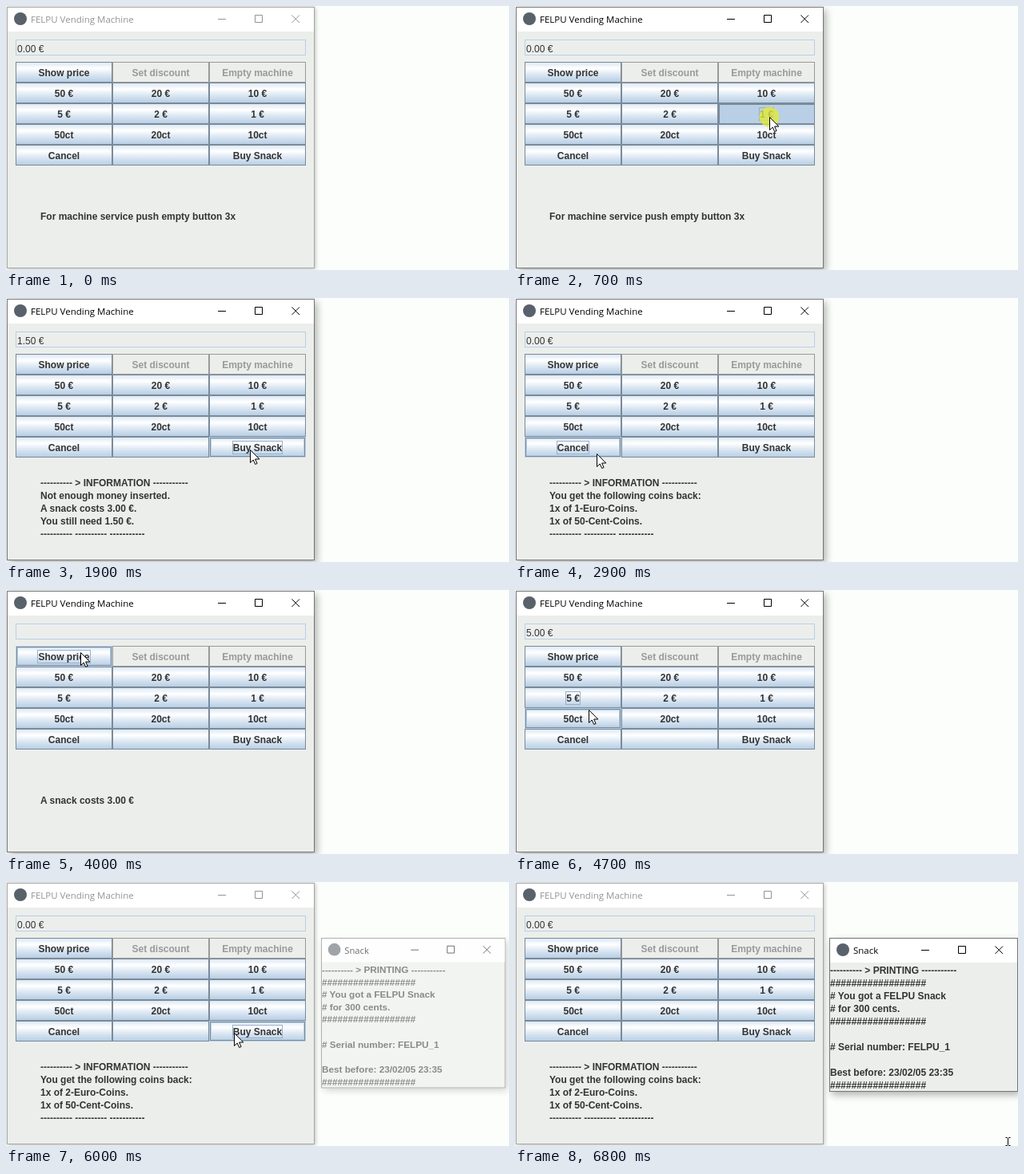
Recreate the animation shown at these times as an HTML page. Size 629x331 px, loop 6.9 s.

```html
<!DOCTYPE html>
<html lang="en">
<head>
<meta charset="utf-8">
<title>Vending machine</title>
<style>
  html, body { margin: 0; width: 100%; height: 100%; overflow: hidden; background: #fcfefc; }
  body { position: relative; font: bold 12px/16px "Liberation Sans", Arial, sans-serif; color: #333; }
  body * { position: absolute; box-sizing: border-box; white-space: pre; }

  .window {
    background: #eceeec; color: #333; transform-origin: 0 0; --ink: #000;
    box-shadow: inset 0 0 0 1px #747674, 3px 4px 9px rgba(0, 0, 0, .3);
  }
  .window.inactive { --ink: #929492; box-shadow: inset 0 0 0 1px #a4a6a4, 1px 1px 5px rgba(0, 0, 0, .25); }
  .bar { left: 1px; right: 1px; top: 1px; height: 30px; background: #fff; }
  .icon { left: 9px; top: 7px; width: 16px; height: 16px; border-radius: 50%; background: #59616b; }
  .title { left: 30px; top: 8px; font: 11.5px/16px "Open Sans", "Noto Sans", sans-serif; color: var(--ink); }
  .controls { right: 0; top: 0; fill: none; stroke: var(--ink); }

  #field { left: 11px; top: 41px; width: 363px; height: 20px; padding: 3px 0 0 1px; border: 1px solid #b8cfe5; font-weight: normal; }
  #message { left: 42px; top: 223px; height: 80px; display: flex; align-items: center; }
  #receipt { left: 1px; top: 33px; }

  .button {
    width: 121px; height: 26px; display: flex; justify-content: center; border: 1px solid #7a8a99;
    background: linear-gradient(#dde8f3, #fff 30%, #dde8f3 60%, #b8cfe5);
  }
  .button span { position: static; height: 15px; margin-top: 5px; }
  .button.disabled { background: none; border-color: #999; color: #999; }
  .button.hover { border-color: #b8cfe5; box-shadow: inset 0 0 0 1px #7a8a99, inset 0 0 0 2px #b8cfe5; }
  .button.pressed { background: #b8cfe5; border-color: #7a8a99; box-shadow: inset 1px 1px #7a8a99; }
  .button.focus span:not(:empty) { outline: 1px solid #96b0cc; }

  #pointer { left: 0; top: 0; overflow: visible; }
</style>
</head>
<body>
<script>
const LOOP = 6900, STEP = 100;
const RULE = "---------- ---------- -----------";
const info = (...lines) => ["---------- > INFORMATION -----------", ...lines, RULE].join("\n");
const change = coin => info("You get the following coins back:", `1x of ${coin}-Euro-Coins.`, "1x of 50-Cent-Coins.");

const LABELS = [
  "Show price", "Set discount", "Empty machine",
  "50 €", "20 €", "10 €",
  "5 €", "2 €", "1 €",
  "50ct", "20ct", "10ct",
  "Cancel", "", "Buy Snack"
];
const DISABLED = ["Set discount", "Empty machine"];

const FIELD = [
  [0, "0.00 €"], [800, "1.00 €"], [1500, "1.50 €"], [2800, "0.00 €"],
  [3800, ""], [4700, "5.00 €"], [5000, "5.50 €"], [5600, "0.00 €"]
];
const MESSAGE = [
  [0, "For machine service push empty button 3x"],
  [800, ""],
  [1900, info("Not enough money inserted.", "A snack costs 3.00 €.", "You still need 1.50 €.")],
  [2800, change(1)],
  [3800, "A snack costs 3.00 €"],
  [4700, ""],
  [5700, change(2)]
];
// start, end, button
const PRESSES = [
  [600, 800, "1 €"], [1200, 1400, "50ct"], [1700, 1800, "Buy Snack"], [2600, 2800, "Cancel"],
  [3600, 3800, "Show price"], [4500, 4700, "5 €"], [4800, 5000, "50ct"], [5400, 5600, "Buy Snack"]
];
// time, x, y
const PATH = [
  [100, 345, 300], [600, 318, 139], [800, 318, 139], [1200, 105, 168], [1400, 105, 168],
  [1700, 305, 190], [2300, 305, 190], [2600, 102, 195], [3300, 102, 195], [3600, 95, 78],
  [3900, 95, 78], [4000, 93, 78], [4300, 93, 78], [4500, 84, 136], [4600, 84, 136],
  [4800, 100, 163], [5000, 100, 163], [5200, 198, 188], [5400, 285, 189], [6300, 285, 189],
  [6400, 302, 202], [6600, 470, 290], [6800, 616, 325]
];
// time, opacity, scale
const POPUP = [[0, 0, 1], [5900, .2, .95], [6000, .57, .977], [6100, .92, .995], [6200, 1, 1]];

const latest = (track, t) => track.filter(row => row[0] <= t).pop();

function add(parent, className, text = "") {
  const node = document.createElement("div");
  node.className = className;
  node.textContent = text;
  parent.append(node);
  return node;
}

function place(node, box) {
  ["left", "top", "width", "height"].forEach((key, i) => {
    if (box[i] !== undefined) node.style[key] = box[i] + "px";
  });
  return node;
}

function addWindow(title, ...box) {
  const node = place(add(document.body, "window"), box);
  add(node, "bar");
  add(node, "icon");
  add(node, "title", title);
  node.insertAdjacentHTML("beforeend", `<svg class="controls" width="130" height="30">
    <path d="M9 15.5h10M55.5 10.5h9v9h-9z"/><path d="M101.5 10.5l9.500 9.500m0-9.500l-9.500 9.500"/></svg>`);
  return node;
}

function addText(parent, id) {
  const node = add(parent, "");
  node.id = id;
  return node;
}

const machine = addWindow("FELPU Vending Machine", 1, 1, 385, 328);
const field = addText(machine, "field");
const message = addText(machine, "message");
const buttons = LABELS.map((label, i) => {
  const x = 12 + i % 3 * 121, y = 70 + Math.floor(i / 3) * 26;
  const enabled = !DISABLED.includes(label);
  const node = place(add(machine, "button"), [x - 1, y - 1]);
  node.classList.toggle("disabled", !enabled);
  node.append(Object.assign(document.createElement("span"), { textContent: label }));
  return { label, x, y, enabled, node };
});

const snack = addWindow("Snack", 393, 70, 236, 193);
const hashes = "#".repeat(18);
addText(snack, "receipt").textContent = [
  "---------- > PRINTING -----------", hashes, "# You got a FELPU Snack", "# for 300 cents.", hashes,
  "", "# Serial number: FELPU_1", "", "Best before: 23/02/05 23:35", hashes
].join("\n");

document.body.insertAdjacentHTML("beforeend", `<svg id="pointer" width="1" height="1">
  <circle id="halo" r="12.500" fill="#e2e83c" fill-opacity=".8"/>
  <path id="arrow" d="M.5.5v16l3.700-3.500 2.500 5.500 2.400-1-2.500-5.500h5.200z" fill="#fff" stroke="#000"/>
  <path id="beam" d="M-2.500-4.500h2l1 1 1-1h2M.5-3.500v8M-2.500 5.500h2l1-1 1 1h2" fill="none" stroke="#000"/>
</svg>`);
const [pointer, halo, arrow, beam] = ["pointer", "halo", "arrow", "beam"].map(id => document.getElementById(id));
const show = (node, visible) => { node.style.display = visible ? "" : "none"; };

function pointerAt(t) {
  const from = latest(PATH, t) || PATH[0];
  const to = PATH[PATH.indexOf(from) + 1] || from;
  const k = to === from ? 0 : (t - from[0]) / (to[0] - from[0]);
  return [1, 2].map(i => Math.round(from[i] + (to[i] - from[i]) * k));
}

function render(t) {
  const [x, y] = pointerAt(t);
  const press = latest(PRESSES, t);
  const held = press && t < press[1];
  const focused = press && t < 6400 ? press[2] : null;

  field.textContent = latest(FIELD, t)[1];
  message.textContent = latest(MESSAGE, t)[1];
  machine.classList.toggle("inactive", t < 600 || t >= 5900);

  for (const b of buttons) {
    const over = x >= b.x && x < b.x + 121 && y >= b.y && y < b.y + 26;
    const style = b.node.classList;
    style.toggle("hover", t >= 100 && b.enabled && over);
    style.toggle("pressed", !!held && b.label === press[2]);
    style.toggle("focus", b.label === focused);
  }

  const [, opacity, scale] = latest(POPUP, t);
  show(snack, opacity > 0);
  snack.style.opacity = opacity;
  snack.style.transform = scale < 1 ? `translate(1px, 0) scale(${scale})` : "none";

  pointer.style.transform = `translate(${x}px, ${y}px)`;
  show(pointer, t >= 100);
  show(halo, held);
  show(arrow, t < 6600);
  show(beam, t >= 6600);
}

const start = performance.now();
function tick() {
  const t = (performance.now() - start) % LOOP;
  render(Math.floor(t / STEP) * STEP);
  requestAnimationFrame(tick);
}
tick();
</script>
</body>
</html>
```
